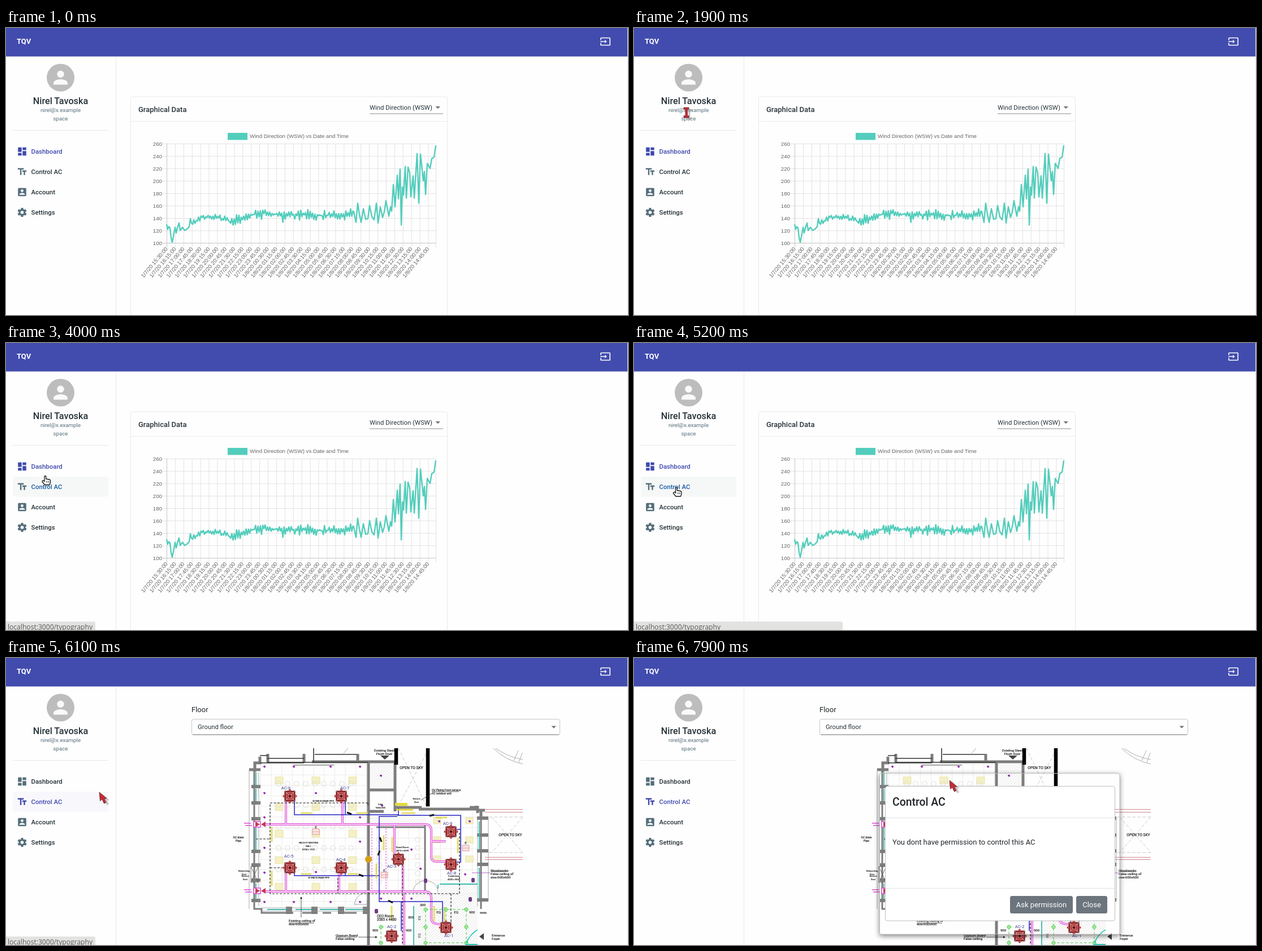
An HTML page that plays this animation: 1100 by 509 pixels, repeating every 8000 ms.

```html
<!DOCTYPE html>
<html lang="en">
<head>
<meta charset="utf-8">
<title>Dashboard</title>
<style>
html, body { margin: 0; width: 100%; height: 100%; overflow: hidden; background: #fefefe; }
svg { display: block; width: 1100px; height: 509px; font-family: Roboto, sans-serif; }
.arial { font-family: "Liberation Sans", Arial, sans-serif; }
.m { font-weight: 500; }
.b { font-weight: 700; }
</style>
</head>
<body>
<svg id="stage" viewBox="0 0 1100 509" xmlns="http://www.w3.org/2000/svg"></svg>
<script>
const stage = document.getElementById('stage');
const $ = id => document.getElementById(id);
const text = (x, y, s, size, fill = '#263238', extra = '') =>
  `<text x="${x}" y="${y}" font-size="${size}" fill="${fill}" ${extra}>${s}</text>`;
const rect = (x, y, w, h, fill, extra = '') =>
  `<rect x="${x}" y="${y}" width="${w}" height="${h}" fill="${fill}" ${extra}/>`;
const path = (d, stroke, width = 1, extra = '') =>
  `<path d="${d}" fill="none" stroke="${stroke}" stroke-width="${width}" ${extra}/>`;
const shape = (d, fill, extra = '') => `<path d="${d}" fill="${fill}" ${extra}/>`;
const circle = (x, y, r, fill, extra = '') => `<circle cx="${x}" cy="${y}" r="${r}" fill="${fill}" ${extra}/>`;
const group = (id, body, extra = '') => `<g id="${id}" ${extra}>${body}</g>`;
const range = (n, fn) => Array.from({ length: n }, (_, i) => fn(i)).join('');
const middle = 'text-anchor="middle"';
const icon = (x, y, body, fill, scale = 0.809) =>
  `<g transform="translate(${x} ${y}) scale(${scale}) translate(-12 -12)" fill="${fill}">${body}</g>`;

function seeded(seed) {
  return () => (seed = (seed * 16807) % 2147483647) / 2147483647;
}

function lerpAt(points, x) {
  let i = 1;
  while (i < points.length - 1 && points[i][0] < x) i++;
  const [x0, y0] = points[i - 1], [x1, y1] = points[i];
  const u = Math.max(0, Math.min(1, (x - x0) / (x1 - x0)));
  return y0 + (y1 - y0) * u;
}

const defs = `<defs>
  <pattern id="tiles" width="18.7" height="18.7" patternUnits="userSpaceOnUse" x="450" y="188">
    <path d="M0 0H18.7M0 0V18.7" stroke="#dcdcd8" fill="none"/></pattern>
  <pattern id="hatch" width="5" height="5" patternUnits="userSpaceOnUse">
    <path d="M0 5L5 0" stroke="#cfcfcf" stroke-width=".6"/></pattern>
  <filter id="lift" x="-20%" y="-20%" width="140%" height="140%"><feGaussianBlur stdDeviation="5"/></filter>
  <mask id="outside"><rect width="1100" height="509" fill="#fff"/><rect x="434" y="204" width="425" height="286" rx="3"/></mask>
  <clipPath id="planClip"><rect x="400" y="160" width="514" height="349"/></clipPath>
</defs>`;

const menu = [
  ['Dashboard', shape('M3 13h8V3H3zM3 21h8v-6H3zM13 21h8V11h-8zM13 3v6h8V3z', 'inherit')],
  ['Control AC', shape('M2.5 4v3h5v12h3V7h5V4zM21.500 9h-9v3h3v7h3v-7h3z', 'inherit')],
  ['Account', shape('M5 3h14q2 0 2 2v14q0 2-2 2H5q-2 0-2-2V5q0-2 2-2zM6 17v1h12v-1c0-2-4-3.100-6-3.100s-6 1.100-6 3.100z', 'inherit', 'fill-rule="evenodd"') +
    circle(12, 9, 3, '#fefefe')],
  ['Settings', circle(12, 12, 7.3, 'inherit') +
    range(3, i => rect(9.400, 2, 5.2, 20, 'inherit', `rx="1" transform="rotate(${i * 60} 12 12)"`)) + circle(12, 12, 3.500, '#fefefe')]
].map(([s, art]) => [s, art.replaceAll('fill="inherit"', '')]);

function frameChrome() {
  const person = shape('M12 12a4 4 0 1 0 0-8a4 4 0 0 0 0 8zM12 14c-2.700 0-8 1.300-8 4v2h16v-2c0-2.700-5.300-4-8-4z', '#fafafa');
  const exit = shape('M21 3H3q-2 0-2 2v4h2V5h18v14H3v-4H1v4q0 2 2 2h18q2 0 2-2V5q0-2-2-2zM11 16l4-4-4-4v3H1v2h10z', '#fff');
  const rows = menu.map(([label, art], i) => {
    const y = 219 + i * 36;
    return rect(12, y - 18, 169, 35.5, '#f7f8fb', `id="hover${i}" rx="3"`) +
      group('icon' + i, icon(28.500, y, art, 'inherit').replace('fill="inherit"', '')) +
      text(44.5, y + 4, label, 11.4, '#263238', `class="m" id="item${i}"`);
  }).join('');
  return path('M194.5 50V509', '#e9e9e9') + rect(0, 0, 1099, 50.5, '#424cae') +
    path('M1099.5 0V509', '#ececec') +
    text(19, 28.3, 'TQV', 13, '#fff', 'class="b"') + icon(1060, 24, exit, '#fff') +
    circle(96.5, 88, 24.5, '#bdbdbd') + icon(96.5, 88, person, '', 1.55) +
    text(96.5, 134.500, 'Nirel Tavoska', 16.2, '#263238', middle + ' class="m"') +
    text(96.5, 149, 'nirel@x.example', 9.7, '#546e7a', middle) +
    text(96.5, 163.5, 'space', 9.7, '#546e7a', middle) +
    path('M12 181.5H181', '#e6e6e6') + rows;
}

function readings() {
  const head = [[284, 130], [286, 122], [288, 126], [290, 124], [292, 108], [294, 101], [296, 110], [299, 125],
    [301, 116], [303, 124], [306, 132], [308, 120], [312, 125], [316, 120], [320, 122], [324, 126], [326, 139]];
  const trend = [[328, 131], [346, 141], [375, 142], [395, 135], [410, 136], [430, 145], [465, 148], [490, 142],
    [512, 146], [560, 144], [612, 147]];
  const tail = [[615, 150], [619, 133], [622, 164], [625, 146], [628, 133], [632, 155], [636, 138], [640, 139],
    [643, 160], [647, 142], [651, 137], [655, 164], [658, 132], [662, 158], [666, 141], [669, 150], [672, 168],
    [677, 143], [680, 158], [682, 151], [685, 194], [688, 158], [692, 209], [694, 171], [697, 219], [699, 129],
    [701, 190], [703, 177], [706, 223], [708, 172], [711, 222], [714, 213], [716, 174], [720, 208], [722, 172],
    [727, 244], [730, 164], [733, 243], [735, 226], [738, 200], [740, 215], [742, 178], [745, 228], [750, 220],
    [753, 236], [757, 238], [760, 257]];
  const random = seeded(4711), body = [];
  for (let x = 328, side = 1; x < 614; x += 2.1, side = -side) {
    const reach = x < 400 ? 4.5 : 9;
    body.push([x, lerpAt(trend, x) + side * reach * Math.pow(random(), 1.3) + random() * 2 - 1]);
  }
  return [...head, ...body, ...tail];
}

function dashboard() {
  const yOf = v => 381 - (v - 100) * 1.1;
  const grid = range(9, i => path(`M276 ${381.5 - 22 * i}H760`, '#e3e3e3') +
    text(276, 384.5 - 22 * i, 100 + 20 * i, 9.7, '#666', 'text-anchor="end"'));
  const columns = range(32, i => {
    const x = 284.5 + i * 14.92, minutes = 930 + 45 * i;
    const hour = String(Math.floor(minutes / 60) % 24).padStart(2, '0');
    const label = `1/${minutes < 1440 ? 7 : 8}/20 ${hour}:${String(minutes % 60).padStart(2, '0')}:00`;
    return path(`M${x} 205V389`, '#e3e3e3') +
      text(0, 0, label, 9.7, '#666', `text-anchor="end" transform="translate(${x + 2} 392) rotate(-50)"`);
  });
  const line = 'M' + readings().map(([x, v]) => x.toFixed(1) + ' ' + yOf(v).toFixed(1)).join('L');
  return rect(220.5, 122, 560, 420, '#fefefe', 'rx="3" stroke="#e9e9e9"') + path('M221 165.5H780', '#ebebeb') +
    text(234, 148.5, 'Graphical Data', 13, '#263238', 'class="m"') +
    text(643, 144.5, 'Wind Direction (WSW)', 11.33) +
    path('M643 152H773', '#8c8c8c') + shape('M759.500 139h8.500l-4.200 4.300z', '#757575') +
    `<g class="arial">${rect(392, 186, 35, 12.5, '#53cdbc')}
    ${text(431, 195, 'Wind Direction (WSW) vs Date and Time', 9.7, '#666')}${grid}${columns}</g>` +
    path('M760.5 205V389', '#e3e3e3') + path('M284.5 205V389M276 381.5H760', '#c4c4c4') +
    path(line, '#53cdbc', 2.4, 'stroke-linejoin="round"');
}

function acUnit(x, y, label, lx, ly) {
  return `<g transform="translate(${x} ${y})">` + rect(-9, -9, 18, 18, '#a3262b', 'stroke="#4a1014"') +
    path('M-9-9L9 9M9-9L-9 9M-6-6H6V6H-6zM-3-3H3V3H-3z', '#e9b7b2', 0.8) + rect(-2, -2, 4, 4, '#5d1216') +
    shape('M0-13l3 3h-6zM0 13l3-3h-6zM-13 0l3-3v6zM13 0l-3-3v6z', '#c33') + '</g>' +
    text(lx, ly, label, 7.8, '#3c3c96', middle);
}

function floorPlan() {
  const lines = (x, y, rows, size = 5.6, extra = '') =>
    rows.split('|').map((s, i) => text(x, y + i * 6.2, s, size, '#111', 'stroke="#111" stroke-width=".15" ' + extra)).join('');
  const small = (x, y, s, size = 4) => lines(x, y, s, size, middle);
  const gray = '#7d7d7d';
  const chair = (x, y) => rect(x - 4, y - 4, 8, 8, 'none', 'rx="2.500" stroke="#deded9"');
  const diamonds = [457, 509, 574, 626].map(x => [193, 433].map(y => [x, y])).flat()
    .concat([240, 283, 337, 381].map(y => [457, y]), [283, 326].map(y => [626, y]),
      [[548, 240], [548, 380], [663, 209], [665, 262], [717, 340], [733, 374], [766, 290], [820, 290], [812, 384], [663, 427], [717, 427]]);

  const rooms = rect(450, 188, 188, 252, 'url(#tiles)') + rect(750, 275, 84, 126, 'url(#tiles)') +
    rect(646, 302, 94, 112, 'url(#tiles)') + rect(645, 187, 43, 46, 'url(#hatch)') +
    rect(644, 274, 98, 24, 'url(#hatch)') + rect(720, 416, 114, 93, 'url(#hatch)') + rect(767, 401, 67, 20, 'url(#hatch)') +
    range(3, c => range(5, r => rect(476 + 65 * c, 211 + 47.2 * r, 14, 12, '#f4f0c6', 'stroke="#e7e2a0"'))) +
    range(6, i => rect(i % 2 ? 813 : 756, 283 + 34 * (i >> 1), 13, 11, '#f4f0c6', 'stroke="#e7e2a0"')) +
    range(9, i => range(5, r => chair(482 + i * 16, 223 + r * 38))) +
    range(6, i => chair(660, 322 + i * 15) + chair(728, 322 + i * 15)) +
    [[548, 308], [669, 385], [813, 337]].map(([x, y]) => rect(x - 6, y - 5, 12, 10, '#fbe5e2', 'stroke="#d99"') + path(`M${x - 6} ${y}h12`, '#d99', 0.8)).join('');

  const walls = path('M449 175V186H440V202M430 198H450M463 170V185M527 170V186M541 184H659M622 170V182M641 182V509M659 184H688V272M642 234H690M688 265H735M730 268H832V262M820 265H834V275M834 270H847M840 270V286M641 272H668', gray, 5) +
    path('M462 178H527M462 185H640M449 173H463M449 186H527M546 171H620M544 160V184', '#333', 1.600) +
    path('M744 160H748V262H744zM688 160H692V188H688z', '#000', 2.500) + path('M746 160V262M690 160V186', '#000', 4) +
    path('M439 200V445H452V452H508M524 452H545M560 452H575M590 452H620M640 430V450M840 285V445M838 452H850M741 297V415M655 300H741', gray, 3) +
    [228, 257, 285, 343, 367, 394, 430].map(y => rect(434, y - 3, 16, 6, gray)).join('') +
    [285, 315, 343, 367, 430].map(y => rect(833, y - 4, 20, 6, gray)).join('') +
    [500, 545, 592, 636].map(x => rect(x - 5, 441, 11, 13, gray)).join('') +
    path('M430 198V445M447 203V440M452 443H638M452 449H638M834 285V440M853 285V430', '#999', 0.8) +
    path('M442 203V226M442 232V254M442 290V340M442 400V428M462 446H497M512 446H540M555 446H588M600 446H632M837 290V340M837 372V428M721 440V509M767 401H834M764 409V402', '#3cb9ad', 1.800) +
    path('M433 370h13v28h-13zM433 370l13 28M446 370l-13 28', '#555', 0.8) + path('M508 190H580', '#aaa', 2) +
    path('M720 416a21 21 0 0 1 21-21a21 21 0 0 1 23 21M642 415a26 26 0 0 0-26 22h26', '#888', 0.8);

  const sky = path('M694 160L743 262M743 170L694 262M859 282L914 345M914 282L859 345M854 282H914M854 345H914', '#bbb', 0.8, 'stroke-dasharray="6 3"') +
    path('M847 268.5H914M847 273.5H914M847 353.5H914M847 357.5H914', '#cf8a90') +
    path('M862 160Q884 182 914 188M866 160Q888 176 914 180M906 164l-8 18M913 168l-6 17M597 169l8-9', '#999', 0.8);

  const magenta = '#dc49d5';
  const ducts = 'M455 295H741Q752 295 752 306V352Q752 361 762 361H778M455 414H741Q752 414 752 425V462Q752 472 768 472M495 254V295M595 256V295M495 382V414M589 382V414M687 295V347M702 367V414M704 414V509M752 325H778';
  const pipes = path(ducts, magenta, 3.800) + path(ducts, '#f9d2f5', 1.800) +
    path('M647 302V412M672 302V412', magenta, 1, 'stroke-dasharray="3 2"') +
    path('M510 254V278H694V266M600 254V278M510 380V386H660V281H692M600 380V386M660 386V432H772V468M692 279H752V279H804V362H797M797 304H804M660 432H699V484', '#2525c4', 1.500) +
    path('M640 257H467V418H802V310M467 372H494M640 257V262M701 366V509M787 418V470M587 390V418M442 321H467', '#222', 1.200, 'stroke-dasharray="4 2.500"') +
    path('M603 274l8 3M624 384l8 3M661 318l3 8M658 350l3-8M676 430l8 4M757 278l-8 2', '#111', 3) +
    [295, 413].map(y => rect(438, y - 5, 12, 10, '#fff', `stroke="${magenta}" stroke-width="1.500"`) + shape(`M441 ${y - 5}l8 5l-8 5zM459 ${y - 5}l-8 5l8 5z`, '#c43a55') + path(`M421 ${y - 2}h12M423 ${y + 2}h12`, magenta, 1.500)).join('');

  const yellow = (x, y, w, h) => path(w ? `M${x} ${y}h${w}` : `M${x} ${y}v${h}`, '#ddd23b', 3, 'stroke-dasharray="2 .7"');
  const notes = [[522, 275, 20], [620, 275, 20], [522, 383, 18], [605, 383, 18], [700, 275, 24], [760, 283, 20]].map(a => yellow(...a)).join('') +
    [[470, 300], [470, 378], [668, 315], [655, 365], [683, 318], [799, 320], [682, 440], [757, 440], [775, 442]].map(([x, y]) => yellow(x, y, 0, 26)).join('') +
    rect(688, 257, 22, 5, '#e5da38') + path('M690 269h30', '#ddd23b', 3);

  const green = path('M742 446H814V505H742zM778 446V466M663 477V505M663 477H672', '#55c94d', 1, 'stroke-dasharray="5 3"') +
    [[742, 446], [778, 446], [814, 446], [742, 477], [814, 477], [742, 505], [814, 505], [663, 477], [663, 505]]
      .map(([x, y]) => circle(x, y, 3, '#dcf7da', 'stroke="#4fd04b"') + path(`M${x - 4} ${y}h8M${x} ${y - 4}v8`, '#4fd04b', 0.7)).join('') +
    path('M812 508H834M834 482q-14 8-20 24', '#31ccb8', 2);

  const units = [[502, 245, 'AC-6', 495, 233], [593, 245, 'AC-7', 599, 233], [502, 372, 'AC-5', 500, 354], [593, 372, 'AC-4', 592, 360],
    [694, 357, 'AC-3', 682, 372], [787, 308, 'AC-9', 781, 296], [787, 366, 'AC-8', 788, 384], [778, 478, 'AC-1', 783, 495], [682, 493, 'AC-2', 682, 479]]
    .map(a => acUnit(...a)).join('');

  const labels = small(669, 166, 'Existing Steel|Flush Door', 6) + small(717, 197, 'OPEN TO SKY', 6.7) + small(892, 316, 'OPEN TO SKY', 6.7) +
    lines(753, 236, 'CU Piping From terrace|AC outdoor unit', 5) + small(726, 251, 'Service|Duct') + small(411, 320, 'AC drain|Pipe', 5) +
    small(421, 379, 'Networking|Duct') + small(423, 388, 'Service|Duct') + small(535, 329, 'FACULTY MEETING|HALL|8700 x 7372') +
    small(701, 337, 'Board Room|4415 x 6600') + lines(656, 460, 'CEO Room|3585 x 4480', 6.3) + lines(583, 494, 'Gypsum Board|False-ceiling', 6) +
    lines(500, 468, 'Existing ceiling of|size:600x600', 6) + lines(857, 379, 'Woodworks|False-ceiling of|size:600x600', 6) +
    lines(859, 494, 'Entrance|Foyer', 6) + small(792, 388, 'Conference|4200 x 5600') + small(561, 255, '32 MM Ø DRAIN PIPE') + small(553, 391, '32 MM Ø DRAIN PIPE') +
    [[653, 485, '900'], [712, 485, '900'], [737, 440, '300'], [716, 462, '500'], [765, 453, 'EQ'], [796, 453, 'EQ'], [824, 453, '900'], [548, 302, 'E'], [669, 379, 'E'], [813, 330, 'E']]
      .map(([x, y, s]) => small(x, y, s, 6)).join('') +
    ['EQ', 'EQ'].map((s, i) => text(0, 0, s, 6, '#111', `transform="translate(733 ${465 + 31 * i}) rotate(-90)"`)).join('') +
    small(662, 261, 'Toilet|1500x1800', 3.500) +
    path('M500 470H545M583 495H621M857 379H886M753 237H801M623 495H655M522 460V425M734 252L753 240', '#333', 0.8) +
    path('M824 381H856', '#a13fc0', 0.8) + shape('M522 423l2 4h-4zM657 495l-4-2v4z', '#222') +
    shape('M662 173H678L670 180zM845 488V500L837 494z', '#444');

  return rooms + sky + walls + pipes + notes + green +
    diamonds.map(([x, y]) => shape(`M${x - 2.500} ${y - 1}l3-1.500l2 2.500l-2.500 2z`, '#9326ad')).join('') +
    [[742, 395], [821, 428], [655, 449], [826, 394]].map(([x, y]) => rect(x - 3, y - 4, 6, 8, '#6d3b87', 'rx="2"')).join('') +
    units + labels + circle(641, 357, 6, '#d4a017');
}

function floorPage() {
  return text(328, 96, 'Floor', 13, '#212529') +
    rect(328.5, 108.5, 651, 27.5, '#fefefe', 'rx="3" stroke="#c6c6c6"') + path('M330 136H978', '#858585') +
    text(339, 126.3, 'Ground floor', 11.33) + shape('M964.500 120.500h8.500l-4.200 4.300z', '#757575') +
    `<g clip-path="url(#planClip)">${floorPlan()}</g>`;
}

function dialog() {
  const button = (x, w, label) => rect(x, 422, w, 31, '#6c757d', 'rx="3.500"') + text(x + w / 2, 441.7, label, 13, '#fff', middle);
  return `<g mask="url(#outside)">${rect(434, 207, 425, 286, '#000', 'opacity=".5" filter="url(#lift)"')}</g>` +
    rect(434.5, 204.5, 424.5, 285.5, 'none', 'rx="3" stroke="#bcbcbc"') +
    rect(444.5, 227.500, 406, 238.5, '#fff', 'rx="4" stroke="#bdbdbd"') +
    path('M445 283.5H850M445 408.5H850', '#dee2e6') +
    text(457, 262.300, 'Control AC', 19.4, '#212529', 'class="m"') +
    text(457, 331, 'You dont have permission to control this AC', 13, '#212529') +
    button(665, 111, 'Ask permission') + button(782, 55, 'Close');
}

function cursors() {
  const arrow = 'M0 0L1.500 15.500L5 12.500L8.500 20L12 18.300L8.700 11.500L13 11z';
  const beam = 'M-5-9H4V-6H1.500V5.500H4V9H-5V5.500H-2V-6H-5z';
  const red = d => shape(d, '#888', 'opacity=".45" transform="translate(5 3)"') + shape(d, '#c32b36', 'stroke="#6d2430" stroke-width=".8"');
  const hand = shape('M-1.500 0Q0-1.500 1.200 0V4.500L7 5.500Q9 6 9 8V11L7.500 15H-1L-5.500 9.500Q-5.500 7-3 7.500L-1.500 9z', '#fff', 'stroke="#111" stroke-width="1.300" stroke-linejoin="round"') +
    path('M2 8v3M4.500 8v3M6.500 8.500v2.500', '#111', 0.8);
  return group('cursor', group('arrow', red(arrow)) + group('beam', red(beam)) + group('hand', hand));
}

const status = rect(-5, 494, 100, 25, '#e2e2e1', 'id="statusBox" rx="3"') +
  text(3, 508, '', 12.1, '#585858', 'id="statusText" style="font-family:\'Open Sans\',sans-serif"');

stage.innerHTML = defs + rect(0, 0, 1100, 509, '#fefefe') + group('dashboard', dashboard()) +
  group('floor', floorPage()) + frameChrome() + group('dialog', dialog()) + group('status', status) + cursors();

// time, x, y of the pointer
const route = [[800, 101, 14], [1000, 102, 62], [1200, 97, 128], [1400, 85, 147], [1600, 70, 149], [1900, 93, 150],
  [2200, 61, 155], [2300, 61, 155], [2600, 58, 167], [2700, 58, 167], [3000, 80, 214], [3100, 80, 214], [3300, 67, 224],
  [3400, 67, 224], [3500, 67, 221], [3900, 67, 221], [4100, 72, 252], [4200, 72, 252], [4300, 75, 257], [5300, 75, 257],
  [5600, 110, 255], [6000, 163, 240], [6100, 165, 238], [6200, 170, 237], [6300, 170, 237], [6700, 370, 151],
  [7000, 560, 187], [7100, 574, 208], [7200, 557, 216], [7300, 558, 217]];
const routeX = route.map(([t, x]) => [t, x]), routeY = route.map(([t, , y]) => [t, y]);
const show = (id, on) => $(id).setAttribute('display', on ? 'inline' : 'none');
const within = (t, a, b) => t >= a && t < b;

function draw(ms) {
  const t = Math.floor(ms / 100) * 100;
  const onFloor = t >= 5300;
  show('dashboard', !onFloor);
  show('floor', onFloor);
  show('dialog', t >= 7600);

  const hovered = within(t, 3200, 4000) ? 0 : within(t, 4000, 6400) ? 1 : -1;
  const active = onFloor ? 1 : 0;
  menu.forEach((_, i) => {
    show('hover' + i, i === hovered);
    $('hover' + i).setAttribute('fill', onFloor ? '#f8f8fc' : '#f5f8f6');
    $('icon' + i).setAttribute('fill', i === active ? '#3f4aae' : '#546e7a');
    $('item' + i).setAttribute('fill', i === hovered && !onFloor ? '#1859a8' : i === active ? '#3f4aae' : '#263238');
  });

  show('status', within(t, 3200, 7900));
  $('status').setAttribute('opacity', t === 3200 || t === 7800 ? 0.5 : 1);
  $('statusBox').setAttribute('width', 5 + (t < 4000 ? 155 : within(t, 5200, 6100) ? 369 : 158));
  $('statusText').textContent = 'localhost:3000/' + (t < 4000 ? 'dashboard' : 'typography');

  const kind = within(t, 1200, 2400) ? 'beam' : within(t, 3200, 5900) ? 'hand' : 'arrow';
  ['arrow', 'beam', 'hand'].forEach(k => show(k, k === kind));
  show('cursor', t >= 800);
  $('cursor').setAttribute('transform', `translate(${lerpAt(routeX, t)} ${lerpAt(routeY, t)})`);
}

const start = performance.now();
function tick() {
  draw((performance.now() - start) % 8000);
  requestAnimationFrame(tick);
}
tick();
</script>
</body>
</html>
```
